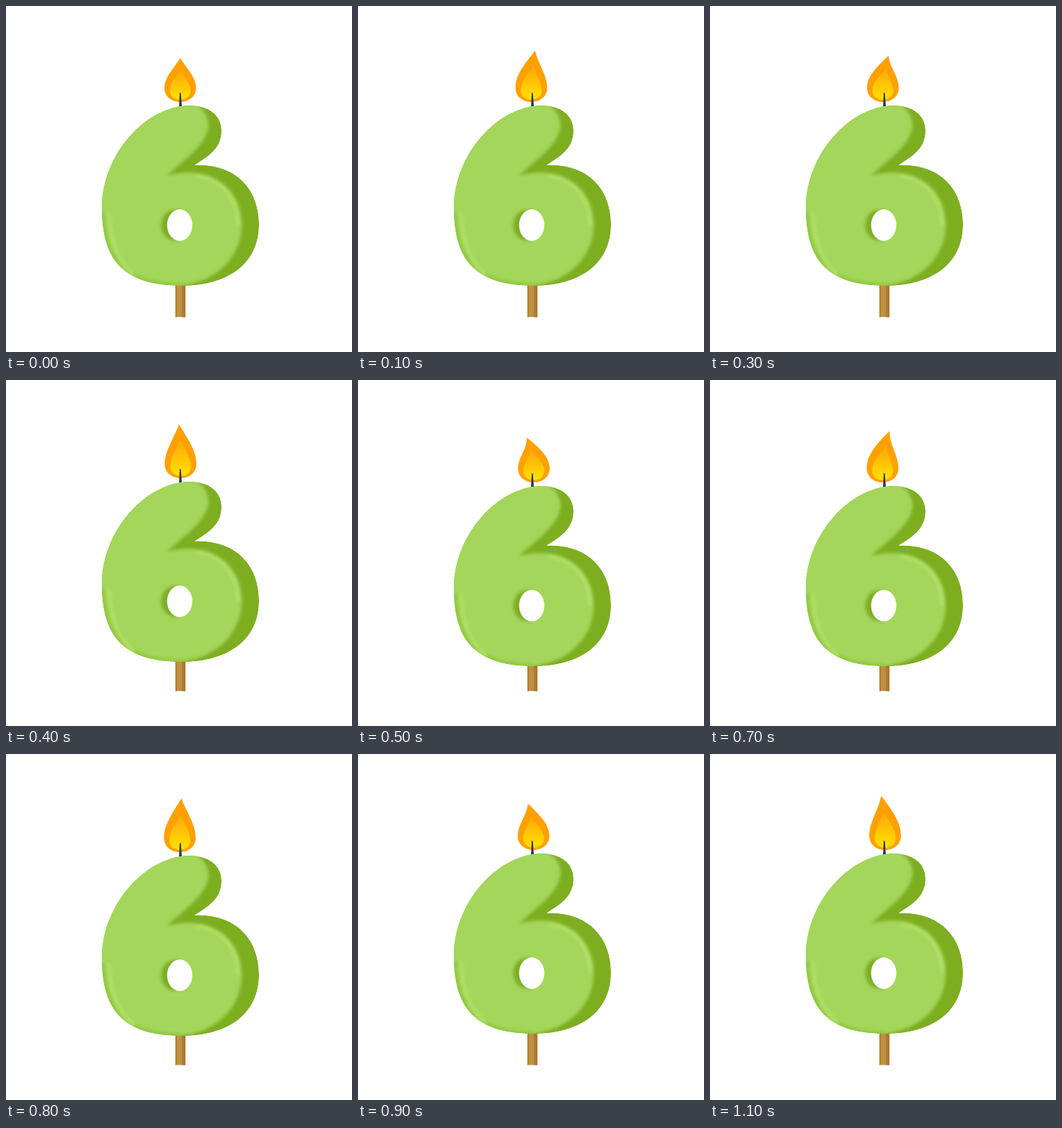
An HTML page for the animation above (1200 ms loop, 480 by 480 pixels).

```html
<!DOCTYPE html>
<html lang="en">
<head>
<meta charset="utf-8">
<title>Birthday candle</title>
<style>
  html, body { margin: 0; width: 100%; height: 100%; overflow: hidden; background: #fff; }
  svg { display: block; width: 100%; height: 100%; }
</style>
</head>
<body>
<svg viewBox="0 0 480 480">
  <defs>
    <linearGradient id="glow" x1="0" y1="0" x2="0" y2="1">
      <stop offset=".1" stop-color="#ffac0c"/>
      <stop offset=".9" stop-color="#ffdc00"/>
    </linearGradient>
    <filter id="soft" x="-20%" y="-20%" width="140%" height="140%"><feGaussianBlur stdDeviation="2.2"/></filter>
    <path id="six" d="M255 138C282 138 299 152 299 173C299 196 284 207 262 220.5C320 218 351 255 351 303C351 360 305 388 245 388C165 388 133 355 133 280C133 205 195 138 255 138Z"/>
    <clipPath id="inside"><use href="#six"/></clipPath>
  </defs>

  <path fill="#be9140" d="M235 380h14v51.500h-14z"/>
  <path fill="#a97a32" d="M235 380h1.500v51.500h-1.500zM244 380h5v51.500h-5z"/>

  <g id="candle">
    <path id="outer" fill="#ffa000"/>
    <path id="inner" fill="url(#glow)"/>
    <path fill="#263a42" d="M241 120.500h1.500L244 140h-4z"/>
    <g clip-path="url(#inside)">
      <use href="#six" fill="#7dae20"/>
      <g filter="url(#soft)" fill="none" stroke-linecap="round">
        <path fill="#a3d65a" d="M250 130C272 138 281 150 281 167C278 194 243 216 224 235C282 219 327 252 327 303C327 350 290 384 240 388L240 402C155 402 120 355 120 280C120 200 190 128 250 130Z"/>
        <path stroke="#92c840" stroke-width="7" d="M134 290C137 355 168 387 240 388"/>
        <path stroke="#b3e067" stroke-width="5" d="M143 288C145 328 154 354 176 372M266 236C301 240 321 268 322 302"/>
        <ellipse cx="234" cy="304" rx="19" ry="21.500" fill="#7dae20"/>
      </g>
    </g>
    <ellipse cx="241" cy="304" rx="17.500" ry="22" fill="#fff"/>
  </g>
</svg>
<script>
  const STEP = 100, STEPS = 12, TAU = Math.PI * 2;
  const $ = id => document.getElementById(id);
  const wave = turns => Math.sin(TAU * turns);

  function drop(tipX, tipY, cx, halfW, bottom) {
    const side = bottom - halfW * 0.9;
    const h = side - tipY;
    const a = tipY + h * 0.34, b = tipY + h * 0.66, low = bottom - halfW * 0.34;
    const neck = halfW * 0.4, foot = halfW * 0.55;
    return `M${tipX} ${tipY}C${cx + neck} ${a} ${cx + halfW} ${b} ${cx + halfW} ${side}` +
      `C${cx + halfW} ${low} ${cx + foot} ${bottom} ${cx} ${bottom}` +
      `C${cx - foot} ${bottom} ${cx - halfW} ${low} ${cx - halfW} ${side}` +
      `C${cx - halfW} ${b} ${cx - neck} ${a} ${tipX} ${tipY}Z`;
  }

  function draw(now) {
    const i = Math.floor(now / STEP) % STEPS;
    const p = i / STEPS;
    // The candle dips once, in the middle of the loop
    const dip = p > 0.25 && p < 0.75 ? 12 * wave(p - 0.25) ** 2 : 0;
    // The flame sways twice and flickers four times, at uneven speed
    const sway = 7.5 * wave(2 * p - 0.15 * wave(p));
    const tipY = 66 + 8 * wave(0.25 + 4 * p + 0.22 * wave(p - 1 / 12));
    const cx = 241.7 - 0.3 * sway;

    $('candle').setAttribute('transform', `translate(0 ${dip})`);
    $('outer').setAttribute('d', drop(241.7 + sway, tipY, cx, 22, 133));
    $('inner').setAttribute('d', drop(cx + sway * 0.65, 130 - (133 - tipY) * 0.66, cx, 14.5, 130));
    requestAnimationFrame(draw);
  }
  draw(0);
</script>
</body>
</html>
```
